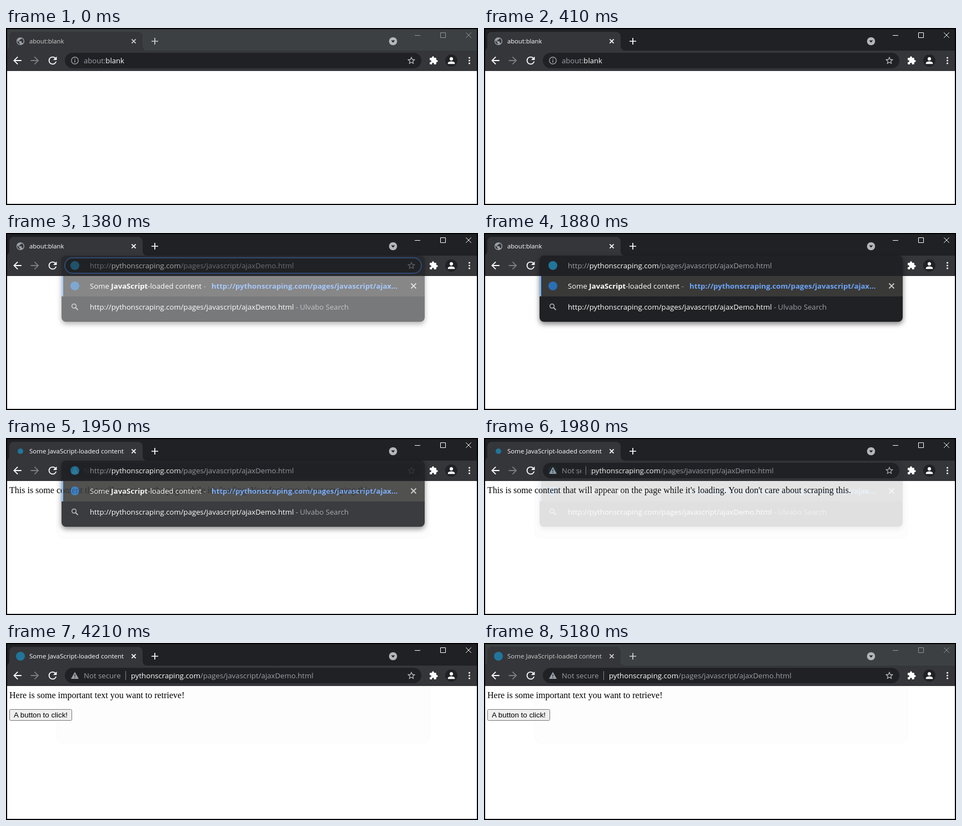
Animation of 850x321 px, one loop 5.58 s. Source, as an HTML page:

```html
<!DOCTYPE html>
<html lang="en">
<head>
<meta charset="utf-8">
<title>Page loading in a browser</title>
<style>
  html, body { margin: 0; width: 100%; height: 100%; overflow: hidden; background: #000; }
  svg { display: block; }
  text { font: 13.2px "Open Sans", "Noto Sans", sans-serif; fill: #fff; white-space: pre; }
  .tab { font-size: 11.5px; }
  .page { font: 16px "Liberation Serif", serif; fill: #000; }
  .button { font: 13.333px "Liberation Sans", sans-serif; fill: #000; }
  .dim { fill: #9aa0a6; }
  .bold { font-weight: 700; }
  .line { fill: none; stroke: #fff; }
  #popup { filter: drop-shadow(0 4px 5px rgba(0, 0, 0, .5)); }
</style>
</head>
<body>
<svg width="850" height="321" viewBox="0 0 850 321">
  <defs>
    <path id="arrow" d="M8 -1H-4.17L1.42 -6.59 0 -8 -8 0 0 8 1.41 6.59 -4.17 1H8Z"/>
    <path id="cross" d="M-1 -1 1 1M1 -1 -1 1" vector-effect="non-scaling-stroke"/>
    <clipPath id="chipClip"><rect id="chipBox" x="140" y="45" width="67" height="28"/></clipPath>
    <clipPath id="stage"><rect x="2" y="2" width="846" height="317"/></clipPath>
  </defs>

  <g clip-path="url(#stage)">
    <!-- page -->
    <rect y="78" width="850" height="243" fill="#fff"/>
    <path id="trace" d="M91 78V168Q91 182 105 182H749Q763 182 763 168V78" fill="#fdfdfd" stroke="#fafafa"/>
    <text id="loading" class="page" x="6" y="100">This is some content that will appear on the page while it's loading. You don't care about scraping this.</text>
    <g id="loaded">
      <text class="page" x="6" y="100">Here is some important text you want to retrieve!</text>
      <rect x="6.5" y="120.5" width="112" height="20" rx="2" fill="#efefef" stroke="#767676"/>
      <text class="button" x="14" y="135">A button to click!</text>
    </g>

    <!-- tab strip -->
    <rect id="strip" width="850" height="42"/>
    <path d="M-2 41A8 8 0 0 0 6 33V15A8 8 0 0 1 14 7H238A8 8 0 0 1 246 15V33A8 8 0 0 0 254 41Z" fill="#35363a"/>
    <path id="globe" class="dim" transform="translate(26 24) scale(.7) translate(-12 -12)" d="M12 2C6.48 2 2 6.48 2 12s4.48 10 10 10 10-4.48 10-10S17.52 2 12 2zm-1 17.93c-3.95-.49-7-3.85-7-7.93 0-.62.08-1.21.21-1.79L9 15v1c0 1.1.9 2 2 2v1.93zm6.9-2.54c-.26-.81-1-1.39-1.9-1.39h-1v-3c0-.55-.45-1-1-1H8v-2h2c.55 0 1-.45 1-1V7h2c1.1 0 2-.9 2-2v-.41c2.93 1.19 5 4.06 5 7.41 0 2.08-.8 3.97-2.1 5.39z"/>
    <circle id="favicon" cx="26" cy="24" fill="#21759b"/>
    <g id="tabText">
      <text id="blankTitle" class="tab" x="42" y="28" style="font-size:11.2px;fill:inherit">about:blank</text>
      <text id="pageTitle" class="tab" x="42" y="28" style="fill:inherit">Some JavaScript-loaded content</text>
    </g>
    <g id="tabIcons" class="line" stroke-width="1.7">
      <use href="#cross" transform="translate(230 24) scale(3.6)"/>
      <path d="M262 24H274M268 18V30"/>
    </g>
    <circle cx="697" cy="24" r="7.3" fill="#b4b6b8"/>
    <path d="M693.5 22.5H700.5L697 26.5Z" fill="#202124"/>
    <g id="winIcons" class="line">
      <path d="M736 13.5H746M782.5 8.5H791.5V17.5H782.5Z"/>
      <use href="#cross" transform="translate(833 13) scale(4.8)"/>
    </g>

    <!-- toolbar -->
    <rect y="41" width="850" height="37" fill="#35363a"/>
    <g fill="#fff">
      <use href="#arrow" transform="translate(20.5 59) scale(.92)"/>
      <use href="#arrow" transform="translate(52 59) scale(-.92 .92)" fill="#7d7e81"/>
      <path transform="translate(84 59) scale(.92) translate(-12 -12)" d="M17.65 6.35A7.96 7.96 0 0 0 12 4a8 8 0 1 0 7.73 10h-2.08A6 6 0 1 1 12 6c1.66 0 3.14.69 4.22 1.78L13 11h7V4l-2.35 2.35z"/>
      <path transform="translate(770 59) scale(.7) translate(-12 -12)" d="M20.5 11H19V7c0-1.1-.9-2-2-2h-4V3.5a2.5 2.5 0 0 0-5 0V5H4c-1.1 0-1.99.9-1.99 2v3.8H3.5c1.49 0 2.7 1.21 2.7 2.7s-1.21 2.7-2.7 2.7H2V20c0 1.1.9 2 2 2h3.8v-1.5c0-1.49 1.21-2.7 2.7-2.7 1.49 0 2.7 1.21 2.7 2.7V22H17c1.1 0 2-.9 2-2v-4h1.5a2.5 2.5 0 0 0 0-5z"/>
      <circle cx="802" cy="59" r="11" fill="#202124"/>
      <path transform="translate(802 59) scale(.78) translate(-12 -12)" d="M12 12c2.21 0 4-1.79 4-4s-1.79-4-4-4-4 1.79-4 4 1.79 4 4 4zm0 2c-2.67 0-8 1.34-8 4v2h16v-2c0-2.66-5.33-4-8-4z"/>
      <circle cx="834.5" cy="54" r="1.6"/><circle cx="834.5" cy="59" r="1.6"/><circle cx="834.5" cy="64" r="1.6"/>
    </g>

    <!-- address bar -->
    <rect x="106" y="45" width="642" height="28" rx="14" fill="#202124"/>
    <rect id="focus" x="106" y="45" width="642" height="28" rx="14" class="line" style="stroke:#4a86e8" stroke-width="2"/>
    <path transform="translate(730 59) scale(.72) translate(-12 -12)" fill="#c4c7ca" d="M22 9.24l-7.19-.62L12 2 9.19 8.63 2 9.24l5.46 4.73L5.82 21 12 17.27 18.18 21l-1.63-7.03L22 9.24zM12 15.4l-3.76 2.27 1-4.28-3.32-2.88 4.38-.38L12 6.1l1.71 4.04 4.38.38-3.32 2.88 1 4.28L12 15.4z"/>
    <g id="blankUrl">
      <circle cx="124" cy="59" r="6.2" class="line" style="stroke:#9aa0a6" stroke-width="1.4"/>
      <path d="M123.2 55.5h1.6v1.6h-1.6zM123.2 58.2h1.6v4.4h-1.6z" class="dim"/>
      <rect id="selection" x="140" y="48" width="73" height="22" fill="#546a8f"/>
      <text x="140" y="64" style="font-size:13.1px"><tspan id="scheme">about:</tspan>blank</text>
    </g>
    <g id="pageUrl">
      <path d="M124 52.5 131 65H117Z" class="dim"/>
      <path d="M123.3 57h1.4v3.6h-1.4zM123.3 61.8h1.4v1.4h-1.4z" fill="#202124"/>
      <text x="140" y="64" class="dim" clip-path="url(#chipClip)">Not secure</text>
      <g id="address">
        <path d="M215.5 51V67" class="line" style="stroke:#85888c"/>
        <text x="225" y="64">pythonscraping.com<tspan class="dim">/pages/javascript/ajaxDemo.html</tspan></text>
      </g>
    </g>

    <!-- suggestions -->
    <g id="popup">
      <rect x="100" y="41" width="654" height="120" rx="8" fill="#202124"/>
      <rect x="100" y="78" width="654" height="37" fill="#393938"/>
      <rect x="100" y="78" width="3" height="37" fill="#7cb5f5"/>
      <circle cx="124" cy="59" r="8" fill="#21759b"/>
      <circle cx="124" cy="96" r="8" fill="#2a6fb5"/>
      <text x="151" y="64" class="dim">http://<tspan fill="#fff">pythonscraping.com</tspan>/pages/javascript/ajaxDemo.html</text>
      <text x="151" y="101">Some <tspan class="bold">JavaScript</tspan>-loaded content<tspan class="dim"> -</tspan></text>
      <text x="370" y="101" class="bold" style="fill:#6ea5f8">http://pythonscraping.com/pages/javascript/ajax…</text>
      <use href="#cross" transform="translate(734 96) scale(4.5)" class="line" style="stroke:#c8cac8" stroke-width="1.8"/>
      <circle cx="122.5" cy="132.5" r="3.8" class="line" style="stroke:#b4b8bc" stroke-width="1.5"/>
      <path d="M125.3 135.3 129.5 139.5" class="line" style="stroke:#b4b8bc" stroke-width="1.8"/>
      <text x="151" y="139">http://pythonscraping.com/pages/javascript/ajaxDemo.html<tspan class="dim"> - Ulvabo Search</tspan></text>
    </g>
  </g>
</svg>
<script>
const LOOP = 5580, OPEN = 1350, LOAD = 1950, STEP = 30;
const $ = id => document.getElementById(id);
const show = (id, on) => { $(id).style.display = on ? "" : "none"; };
const clamp = v => Math.max(0, Math.min(1, v));
const hold = (t, from) => from + Math.floor((t - from) / STEP) * STEP;

function draw(t) {
  const active = t >= 410 && t < 5180;
  const focused = t >= 1020 && t < LOAD;
  const loaded = t >= LOAD;
  const q = hold(t, LOAD);

  $("strip").setAttribute("fill", active ? "#202124" : "#3c4043");
  $("tabText").setAttribute("fill", active ? "#fff" : "#cfd0cd");
  $("tabIcons").style.stroke = active ? "#fff" : "#cfd0cd";
  $("winIcons").style.stroke = active ? "#fff" : "#94979a";

  show("globe", !loaded);
  show("blankTitle", !loaded);
  show("favicon", loaded);
  show("pageTitle", loaded);
  $("favicon").setAttribute("r", 5 + 3 * clamp((q - 1980) / 180));

  show("focus", focused);
  show("selection", focused);
  $("scheme").setAttribute("fill", focused ? "#fff" : "#9aa0a6");
  show("blankUrl", t < OPEN);

  // the security label slides open and pushes the address right
  const slide = 1 - (1 - clamp((q - 1935) / 146)) ** 2;
  show("pageUrl", loaded);
  $("chipBox").setAttribute("width", 67 * slide);
  $("address").setAttribute("transform", `translate(${-67 * (1 - slide)} 0)`);

  const fade = loaded
    ? clamp((1985 - q) / 40)
    : clamp(.4 + (hold(t, OPEN) - OPEN) / 150);
  show("popup", t >= OPEN && fade > 0);
  $("popup").style.opacity = fade;

  show("trace", loaded);
  show("loading", loaded && t < 4210);
  show("loaded", t >= 4210);
}

function tick() {
  draw(performance.now() % LOOP);
  requestAnimationFrame(tick);
}
tick();
</script>
</body>
</html>
```
